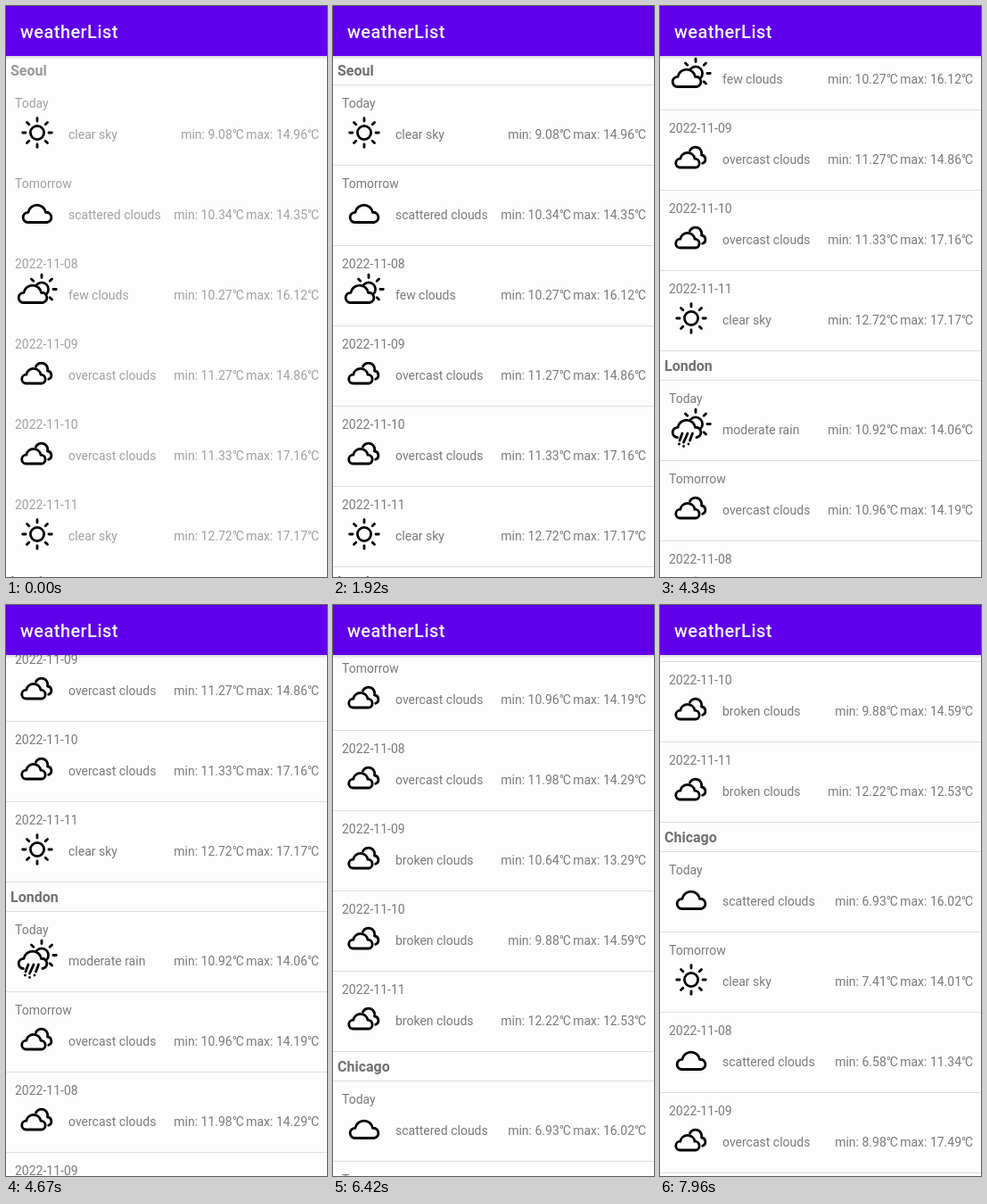
Write an HTML page that moves like this. It is 360 px wide and 640 px high and loops after 8000 ms.

```html
<!DOCTYPE html>
<html lang="en">
<head>
<meta charset="utf-8">
<title>weatherList</title>
<style>
  html, body { margin: 0; width: 100%; height: 100%; overflow: hidden; background: #fdfdfd; }
  svg { display: block; width: 360px; height: 640px; font: 14px Roboto, sans-serif; }
  #list text { fill: #7a7a7a; opacity: calc(.7 + .3 * var(--sharp)); }
  #list .city { font-size: 16px; font-weight: 700; fill: #707070; }
  .line { stroke: #dedede; opacity: var(--sharp); }
  .unit { letter-spacing: -1.2px; }
  .icon { fill: none; stroke: #000; stroke-width: 2.8; stroke-linecap: round; stroke-linejoin: round; }
  .cover { fill: #fdfdfd; }
  .title { font-size: 20px; font-weight: 500; letter-spacing: .45px; fill: #f8f4ff; }
</style>
</head>
<body>
<svg viewBox="0 0 360 640">
  <defs>
    <linearGradient id="shade" x2="0" y2="1">
      <stop stop-color="#000" stop-opacity=".16"/>
      <stop offset="1" stop-color="#000" stop-opacity="0"/>
    </linearGradient>
  </defs>
  <g id="list"></g>
  <rect y="56" width="360" height="4" fill="url(#shade)"/>
  <rect width="360" height="56" fill="#6000ea"/>
  <text class="title" x="16" y="36">weatherList</text>
</svg>
<script>
const FPS = 24, LOOP = 8000;
const days = ['Today', 'Tomorrow', '2022-11-08', '2022-11-09', '2022-11-10', '2022-11-11'];
const cities = {
  Seoul: ['clear sky 9.08 14.96', 'scattered clouds 10.34 14.35', 'few clouds 10.27 16.12',
    'overcast clouds 11.27 14.86', 'overcast clouds 11.33 17.16', 'clear sky 12.72 17.17'],
  London: ['moderate rain 10.92 14.06', 'overcast clouds 10.96 14.19', 'overcast clouds 11.98 14.29',
    'broken clouds 10.64 13.29', 'broken clouds 9.88 14.59', 'broken clouds 12.22 12.53'],
  Chicago: ['scattered clouds 6.93 16.02', 'clear sky 7.41 14.01', 'scattered clouds 6.58 11.34',
    'overcast clouds 8.98 17.49']
};

// Icons, placed relative to the top of a row
const rays = (cx, cy, turns) => turns.map(i =>
  `<path d="M13 0H16.3" transform="translate(${cx} ${cy}) rotate(${i * 45})"/>`).join('');
const sun = `<circle cx="35" cy="54" r="7.6"/>` + rays(35, 54, [0, 1, 2, 3, 4, 5, 6, 7]);
const backSun = `<circle cx="40" cy="49.5" r="7.6"/>` + rays(40, 49.5, [-3, -2, -1, 0, 1]);
const dome = 'M24.5 64.5a5.6 5.6 0 0 1 .5-11.2A9.9 9.9 0 0 1 44.5 53.3A5.6 5.6 0 0 1 46 64.5';
const cloud = `<path d="${dome}z"/>`;
const twoClouds = `<path d="M22.5 65a4.9 4.9 0 0 1 .3-9.8A8.2 8.2 0 0 1 39 55.2A5 5 0 0 1 40.5 65z"/>
  <path d="M33.5 46A7 7 0 0 1 46.5 51A4.8 4.8 0 0 1 47.7 60.3"/>`;
const front = d => `<path class="cover" transform="translate(-5)" d="${d}"/>`;
const rain = '<path d="M25 60L22 68M31 60L26.5 70M36.5 60L33.5 68M21.5 72v0M26.5 74.5v0M32 72v0"/>';
const icons = {
  clear: sun, scattered: cloud, overcast: twoClouds, broken: twoClouds,
  few: backSun + front(dome + 'z'),
  moderate: backSun + front(dome) + rain
};

const line = y => `<path class="line" d="M0 ${y + .5}H360"/>`;
const temp = (label, value) => `${label}: ${value}<tspan class="unit">°C</tspan>`;

function row(day, entry, y) {
  const [kind, noun, min, max] = entry.split(' ');
  return `<g transform="translate(0 ${y})">
    <text x="10" y="26">${day}</text>
    <g class="icon">${icons[kind]}</g>
    <text x="70" y="61">${kind} ${noun}</text>
    <text x="350" y="61" text-anchor="end">${temp('min', min)} ${temp('max', max)}</text>
    ${line(90)}</g>`;
}

let y = 56, markup = '';
for (const [city, entries] of Object.entries(cities)) {
  markup += `<text class="city" x="5" y="${y + 22}">${city}</text>` + line(y + 32);
  y += 32;
  entries.forEach((entry, i) => {
    markup += row(days[i], entry, y);
    y += 90;
  });
  y += 1;
}
const list = document.getElementById('list');
list.innerHTML = markup;

// A swipe: the finger drags for 7 ticks, then the list coasts to a stop
function swipe(n, length) {
  if (n <= 0) return 0;
  if (n <= 7) return .42 * (n / 7) ** 1.3;
  return 1 - .58 * Math.max(0, 1 - (n - 7) / (length - 7)) ** 3;
}

function draw(now) {
  const tick = Math.floor(now % LOOP * FPS / 1000 + .1);
  const scroll = 321 * swipe(tick - 93, 23) + 449 * swipe(tick - 142, 21) + 448 * swipe(tick - 184, 21);
  list.setAttribute('transform', `translate(0 ${-Math.round(scroll)})`);
  list.style.setProperty('--sharp', Math.min(1, tick / 20));
  requestAnimationFrame(() => draw(performance.now() - start));
}
const start = performance.now();
draw(0);
</script>
</body>
</html>
```
